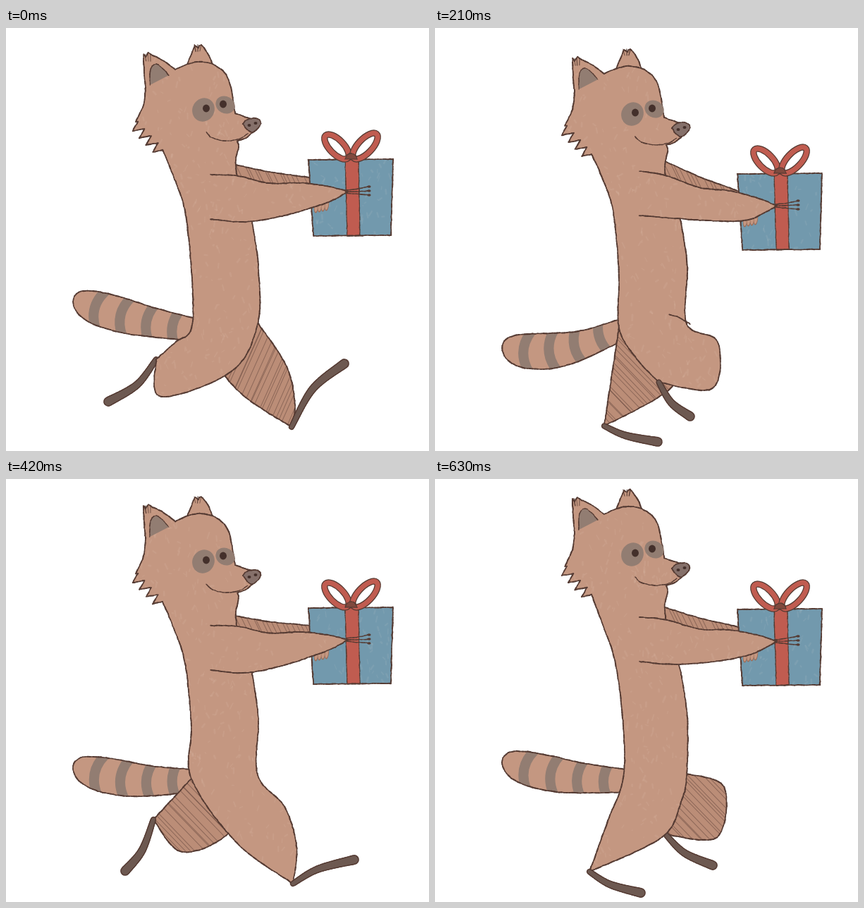
An HTML page with a canvas that plays this animation: 600x600 px, repeating every 700 ms.

```html
<!DOCTYPE html>
<html>
<head>
<meta charset="utf-8">
<style>
html, body { margin: 0; width: 100%; height: 100%; overflow: hidden; background: #fff; }
canvas { display: block; }
</style>
</head>
<body>
<canvas id="stage" width="600" height="600"></canvas>
<script>
const STEP = 70, COUNT = 10;
const SKIN = '#c49781', SHADE = '#bb8d77', GREY = '#927d72', LINE = '#553b33',
      FOOT = '#6d5951', BLUE = '#7299ad', RED = '#c05c50', EYE = '#44302b';

// Vertical keys per step.
const bob = [-1, 3, 21, 5, -12, -4, 0, 16, 4, -10];
const boxY = [186, 187, 206, 206, 183, 181, 182, 200, 198, 184];
const shoulder = [208, 211, 238, 203, 199, 204, 208, 222, 201, 196];
const tailY = [388, 408, 427, 454, 435, 422, 410, 434, 458, 402];

// One stride, shared by both legs half a cycle apart: thigh, knee, heel, toe.
const stride = [
  [[398, 480], [410, 535], [405, 566], [480, 476]],
  [[395, 465], [412, 520], [407, 574], [494, 540]],
  [[412, 482], [437, 530], [388, 587], [472, 584]],
  [[366, 472], [366, 525], [303, 587], [388, 587]],
  [[350, 455], [322, 508], [219, 557], [292, 587]],
  [[320, 487], [220, 523], [213, 470], [145, 530]],
  [[318, 500], [250, 529], [209, 483], [169, 556]],
  [[345, 478], [300, 548], [252, 490], [208, 541]],
  [[374, 470], [375, 520], [289, 498], [266, 560]],
  [[410, 437], [400, 508], [327, 504], [394, 548]]
];
// The swing hurries a little after the legs pass each other.
const lead = k => k === 3 ? .75 : k === 4 ? .25 : 0;

let g, seed;
const rnd = () => (seed = seed * 16807 % 2147483647) / 2147483647;
const jit = a => (rnd() - .5) * a;
const mix = (a, b, t) => a + (b - a) * t;
const mixPt = (a, b, t) => [mix(a[0], b[0], t), mix(a[1], b[1], t)];
const parse = s => s.split('/').map(part => part.trim().split('  ').map(p => p.split(' ').map(Number)));

// Joins smooth curves; each one starts where the previous one ended.
function trace(...curves) {
  const out = [curves[0][0]];
  curves.forEach((curve, n) => {
    const p = n ? [out[out.length - 1], ...curve] : curve;
    for (let i = 0; i < p.length - 1; i++) {
      const b = p[i], c = p[i + 1], a = p[i - 1] || b, d = p[i + 2] || c;
      const k = Math.max(1, Math.ceil(Math.hypot(c[0] - b[0], c[1] - b[1]) / 4));
      for (let j = 1; j <= k; j++) {
        const t = j / k;
        out.push([0, 1].map(m => b[m] + .5 * t * (c[m] - a[m]
          + t * (2 * a[m] - 5 * b[m] + 4 * c[m] - d[m] + t * (3 * (b[m] - c[m]) + d[m] - a[m])))));
      }
    }
  });
  return out;
}

function area(p) {
  const path = new Path2D();
  p.forEach(q => path.lineTo(...q));
  path.closePath();
  return path;
}

function fill(p, color) {
  g.fillStyle = color;
  g.fill(area(p));
}

function segment(a, b, w) {
  g.lineWidth = w;
  g.beginPath();
  g.moveTo(...a);
  g.lineTo(...b);
  g.stroke();
}

function pencil(p, w = 1.8, closed) {
  g.strokeStyle = LINE;
  g.lineCap = 'round';
  const q = (closed ? [...p, p[0]] : p).map(([x, y]) => [x + jit(.7), y + jit(.7)]);
  for (let i = 1; i < q.length; i++) segment(q[i - 1], q[i], w + jit(.8));
}

function shape(p, color, w) {
  fill(p, color);
  pencil(p, w, true);
}

function inside(p, draw) {
  g.save();
  g.clip(area(p));
  draw();
  g.restore();
}

function hatch(p, deg, gap) {
  inside(p, () => {
    g.translate(300, 400);
    g.rotate(deg * Math.PI / 180);
    g.strokeStyle = LINE;
    g.globalAlpha = .45;
    for (let y = -440; y < 440; y += gap + jit(2))
      segment([-440, y + jit(8)], [440, y + jit(8)], 1);
  });
}

function chalk(p) {
  inside(p, () => {
    g.strokeStyle = 'rgba(255,235,220,.07)';
    for (let i = 0; i < 900; i++) {
      const x = 180 + rnd() * 370, y = 30 + rnd() * 550;
      segment([x, y], [x + jit(8), y + jit(16)], 1 + rnd() * 2);
    }
  });
}

function oval(x, y, rx, ry, rot, color) {
  g.fillStyle = color;
  g.beginPath();
  g.ellipse(x, y, rx, ry, rot, 0, 7);
  g.fill();
}

// Head without the cheek fur, from cheek to throat.
const skull = parse('184 134  195 110  198 85/196 65  195 38/198 42/202 36/208 40/221 46  240 60/' +
  '258 52  278 49  300 56  316 75  325 122/336 126  348 130/350 149/340 157  328 161/330 170  326 188  327 207');
const farEar = trace(...parse('256 55  263 38  268 26/273 29/277 25  288 40  294 57'));
const innerEar = trace(...parse('204 82  205 59  213 52  222 58  231 68'));
const smile = trace(...parse('284 149  293 157  312 161  332 158  343 151'));

function fur() {
  const neck = [222, 174], cheek = [184, 134], teeth = [[neck]];
  for (let i = 0; i < 4; i++) {
    const [x, y] = mixPt(neck, cheek, (i + .5) / 4), b = mixPt(neck, cheek, (i + 1) / 4);
    teeth.push([[x - 9, y + 8]], [[b[0] + 3, b[1]]]);
  }
  return teeth;
}
const head = trace(...fur(), ...skull);
const shift = (p, dy) => p.map(([x, y]) => [x, y + dy]);

function legAt(phase) {
  const i = Math.floor(phase), t = phase - i;
  const a = stride[i % COUNT], b = stride[(i + 1) % COUNT];
  const [thigh, knee, heel, toe] = a.map((p, j) => mixPt(p, b[j], t));
  return { thigh, knee, heel, toe, phase: phase % COUNT };
}

// Underside of the thigh, sagging more the further the leg reaches forward.
function underside(leg, hip) {
  const p = mixPt(leg.heel, hip, .55);
  return [p[0], p[1] + Math.max(0, leg.heel[0] - hip[0]) * .17];
}

function drawFoot({ heel, toe }) {
  const bend = [mix(heel[0], toe[0], .4), mix(heel[1], toe[1], .6)];
  const p = trace([heel, bend, toe]);
  g.lineCap = 'round';
  for (const [color, trim] of [[LINE, 0], [FOOT, 3]]) {
    g.strokeStyle = color;
    for (let i = 1; i < p.length; i++)
      segment(p[i - 1], p[i], 8 + 6 * i / p.length - trim);
  }
}

function drawFarLeg(leg, hip) {
  const p = trace([[357, 418], leg.thigh, leg.knee, leg.heel], [underside(leg, hip), hip]);
  shape(p, SHADE);
  hatch(p, leg.heel[0] > 350 ? -66 : 46, 6);
  drawFoot(leg);
}

function drawTail(tipY, rootX) {
  const tip = [95, tipY], root = [rootX + 4, 428];
  const sag = (tipY - 370) * .18;
  const mid = t => [mix(tip[0], root[0], t), mix(tipY, root[1], t) + 4 * t * (1 - t) * sag];
  const edge = side => [[.05, 16], [.19, 24], [.42, 25], [.66, 21], [1, 16]].map(([t, w]) => {
    const [x, y] = mid(t);
    return [x, y + side * w];
  });
  const p = trace([...edge(-1).reverse(), tip, ...edge(1)]);
  fill(p, SKIN);
  inside(p, () => {
    g.strokeStyle = GREY;
    g.lineWidth = 14;
    for (let i = 0; i < 4; i++) {
      const t = .19 + i * .213, a = mid(t - .05), b = mid(t + .05);
      g.save();
      g.translate(...mid(t));
      g.rotate(Math.atan2(b[1] - a[1], b[0] - a[0]));
      g.beginPath();
      g.moveTo(7, -28);
      g.quadraticCurveTo(-11, 0, 7, 28);
      g.stroke();
      g.restore();
    }
  });
  pencil(p);
}

function drawLoop(x0, y0, x1, y1) {
  const r = Math.hypot(x1 - x0, y1 - y0) / 2 - 2;
  g.beginPath();
  g.ellipse((x0 + x1) / 2, (y0 + y1) / 2, r, 10, Math.atan2(y1 - y0, x1 - x0), 0, 7);
  for (const [w, color] of [[9.5, LINE], [7, RED]]) {
    g.lineWidth = w;
    g.strokeStyle = color;
    g.stroke();
  }
}

function drawBox(y) {
  const x = 429, h = 108;
  const quad = (a, b, c, d) => trace([[x + a, y + 1]], [[x + b, y]], [[x + c, y + h]], [[x + d, y + h + 1]], [[x + a, y + 1]]);
  const p = quad(0, 120, 117, 7);
  fill(p, BLUE);
  chalk(p);
  shape(quad(52, 71, 73, 55), RED, 1.2);
  pencil(p);
  drawLoop(x + 57, y, x + 23, y - 35);
  drawLoop(x + 63, y, x + 98, y - 37);
  shape(trace([[x + 52, y], [x + 55, y - 6], [x + 61, y - 8], [x + 66, y - 6], [x + 69, y]]), '#80493e', 1.2);
}

function drawFarArm(s, y) {
  const a = [326, s - 14], b = [432, y + 26], m = mixPt(a, b, .45);
  const top = trace([a, [m[0], m[1] + 2], b]);
  const p = [...top, [b[0], b[1] + 13], [345, s + 18], [a[0], s + 6]];
  fill(p, SHADE);
  hatch(p, 64, 6);
  pencil(top);
}

function drawArm(s, y) {
  const hand = [485, y + 46], hy = hand[1], from = [290, s];
  const top = [[0, 0], [.2, -3], [.43, 2], [.65, -4], [.85, -4], [1, 0]].map(([t, d]) => {
    const p = mixPt(from, hand, t);
    return [p[0], p[1] + d];
  });
  for (let i = -1; i < 3; i++) {
    oval(445 + i * 5, hy + 21 - i, 3.1, 8.5, .1, '#9a6c58');
    oval(445 + i * 5, hy + 20 - i, 2.4, 8, .1, SKIN);
  }
  const p = trace(top, [[464, hy + 12], [440, hy + 21], [395, (hy + s) / 2 + 46], [340, s + 67], [290, s + 63]]);
  fill(p, SKIN);
  chalk(p);
  pencil(p);
  for (let i = -1; i < 2; i++) {
    const tip = [515, hy - 1 + i * 6];
    pencil(trace([[482, hy + i * 2], [497, hy + i * 3.5], tip]), 1.4);
    oval(...tip, 2.6, 1.7, 0, LINE);
  }
}

function drawFace() {
  oval(280, 117, 15.5, 17, .5, GREY);
  oval(311, 110, 14, 12, .5, GREY);
  oval(284, 115, 5, 5.4, 0, EYE);
  oval(308, 109, 5, 5.4, 0, EYE);
  const nose = trace([[336, 137], [342, 131], [354, 129], [361, 133], [360, 140], [350, 149], [342, 145], [336, 137]]);
  shape(nose, '#85706a', 1.6);
  oval(345, 139, 2.5, 2, 0, EYE);
  oval(354, 136, 2.5, 2, 0, EYE);
  pencil(smile, 1.4);
  fill(innerEar, GREY);
  pencil(innerEar, 1.3);
  for (let i = -1; i < 2; i++) pencil([[201 + i * 4, 38], [202 + i * 3, 48]], 1);
}

function lifted(dy, draw) {
  g.save();
  g.translate(0, dy);
  draw();
  g.restore();
}

function drawStep(k) {
  const dy = bob[k], s = shoulder[k], y = boxY[k];
  const hip = [263 - dy * .4, 425];
  const far = legAt(k + lead(k)), near = legAt(k + COUNT / 2 + lead(k));
  const tucked = near.toe[0] < near.heel[0];

  drawTail(tailY[k], hip[0]);
  drawFarLeg(far, hip);
  if (tucked) drawFoot(near);
  lifted(dy, () => {
    shape(farEar, SKIN);
    for (let i = -1; i < 2; i++) pencil([[272 + i * 5, 25], [272 + i * 3, 34]], 1);
  });
  drawFarArm(s, y);
  drawBox(y);

  const upper = shift(head, dy);
  const body = [...upper, ...trace(
    [[349, 275], [358, 340], [357, 420], near.thigh, near.knee, near.heel],
    [underside(near, hip), hip, [hip[0], 350], [254 - dy * .2, 262], [238, 212 + dy * .5], upper[0]])];
  fill(body, SKIN);
  chalk(body);
  pencil(body, 1.8, true);
  if (near.phase > 8) pencil(trace([[332, 406], [347, 411], [362, 420]]));
  if (!tucked) drawFoot(near);
  drawArm(s, y);
  lifted(dy, drawFace);
}

const poses = Array.from({ length: COUNT }, (_, k) => {
  const c = document.createElement('canvas');
  c.width = c.height = 600;
  g = c.getContext('2d');
  g.fillStyle = '#fff';
  g.fillRect(0, 0, 600, 600);
  seed = 4001 + k * 977;
  drawStep(k);
  return c;
});

const view = document.getElementById('stage').getContext('2d');
const start = performance.now();
function tick() {
  const t = Math.max(0, performance.now() - start);
  view.drawImage(poses[Math.floor(t / STEP) % COUNT], 0, 0);
  requestAnimationFrame(tick);
}
tick();
</script>
</body>
</html>
```
